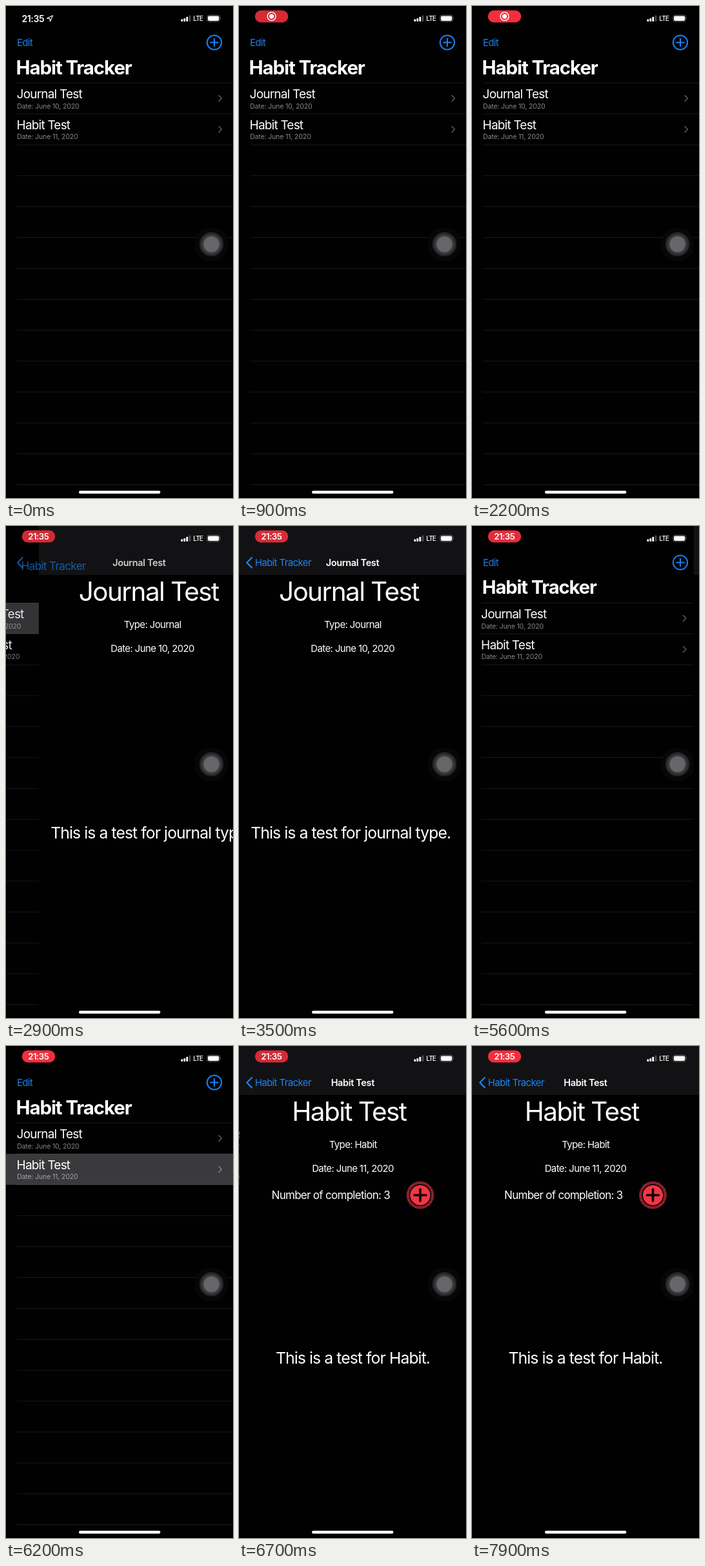
Animation, 352 px wide and 762 px high, one loop 8 s. Source, as an HTML page:

```html
<!DOCTYPE html>
<html lang="en">
<head>
<meta charset="utf-8">
<title>Habit list</title>
<style>
  html, body { margin: 0; width: 100%; height: 100%; overflow: hidden; background: #000; }
  svg { display: block; width: 100vw; height: 100vh; }
  text { font-family: Inter, Roboto, sans-serif; font-optical-sizing: none; fill: #fff; white-space: pre; }
  .mid { text-anchor: middle; }
  .body { font-size: 15px; letter-spacing: -.62px; }
  .blue { fill: #1b83f0; }
  .head { font-size: 29.5px; font-weight: 700; letter-spacing: -1.12px; }
  .bar { font-size: 14.5px; font-weight: 600; letter-spacing: -.36px; }
  .row { font-size: 19px; letter-spacing: -.8px; }
  .sub { font-size: 10.7px; letter-spacing: -.22px; fill: #85858a; }
  .hero { font-size: 40.5px; letter-spacing: -1.62px; }
  .note { font-size: 24.8px; letter-spacing: -.94px; }
  .count { font-size: 17px; letter-spacing: -.71px; }
  .clock { font-size: 14px; font-weight: 600; letter-spacing: -.4px; }
  .small { font-size: 13.2px; letter-spacing: -.45px; }
  .net { font-size: 10.2px; font-weight: 500; letter-spacing: -.95px; }
  .line { fill: none; stroke-linecap: round; stroke-linejoin: round; }
</style>
</head>
<body>
<svg viewBox="0 0 352 762" preserveAspectRatio="none">
  <rect width="352" height="762" fill="#010102"/>

  <g id="list">
    <g id="rules" stroke="#1d1d20" stroke-width=".9"></g>
    <text class="row" x="16.6" y="143">Journal Test</text>
    <text class="sub" x="17" y="158.6">Date: June 10, 2020</text>
    <text class="row" x="16.6" y="191">Habit Test</text>
    <text class="sub" x="17" y="206.4">Date: June 11, 2020</text>
    <path class="line" d="M330 138.5l4.4 4.5l-4.4 4.5M330 186.5l4.4 4.5l-4.4 4.5" stroke="#59595d" stroke-width="1.6"/>
    <rect id="hiA" y="119" width="352" height="48" fill="#fbf8ff" fill-opacity=".23"/>
    <rect id="hiB" y="167" width="352" height="48" fill="#fbf8ff" fill-opacity=".23"/>
  </g>

  <g id="detail">
    <rect width="352" height="762" fill="#010102"/>
    <rect width="352" height="75" fill="#121214"/>
    <rect y="75" width="352" height=".6" fill="#1c1c1e"/>
    <g id="journal">
      <text class="hero mid" x="170.4" y="116">Journal Test</text>
      <text class="body mid" x="176.3" y="158">Type: Journal</text>
      <text class="body mid" x="176.2" y="194.5">Date: June 10, 2020</text>
      <text class="note mid" x="173.2" y="484">This is a test for journal type.</text>
    </g>
    <g id="habit">
      <text class="hero mid" x="170.4" y="116">Habit Test</text>
      <text class="body mid" x="176.2" y="158">Type: Habit</text>
      <text class="body mid" x="176" y="194.5">Date: June 11, 2020</text>
      <text class="count mid" x="141.8" y="237">Number of completion: 3</text>
      <text class="note mid" x="176" y="492">This is a test for Habit.</text>
      <g transform="translate(280.5 231)">
        <circle r="19.2" fill="none" stroke="#e8394a" stroke-width="4.2" pathLength="120" stroke-dasharray="1.15 .85"/>
        <circle r="15.6" fill="#f23543"/>
        <path class="line" d="M-9 0H9M0-9V9" stroke="#0a0506" stroke-width="3.6"/>
      </g>
    </g>
  </g>

  <g id="tools">
    <text class="body blue" x="16.9" y="61.5">Edit</text>
    <g class="line" stroke="#1b83f5" stroke-width="2">
      <circle cx="323" cy="56.5" r="11.1"/>
      <path d="M317.2 56.5h11.6M323 50.7v11.6"/>
    </g>
  </g>
  <text id="big" class="head">Habit Tracker</text>
  <text id="back" class="body blue">Habit Tracker</text>
  <path id="arrow" class="line" d="M19.8 49l-7.6 7.7l7.6 7.7" stroke="#1b83f0" stroke-width="2.3"/>
  <text id="barTitle" class="bar mid" y="61.5"></text>

  <g id="plain">
    <text class="clock" x="24.5" y="24.5">21:35</text>
    <path class="line" d="M72.6 14.8L63.6 18.9L67.9 19.6L68.5 23.8Z" stroke="#fff" stroke-width="1.1"/>
  </g>
  <g id="pill">
    <rect id="pillBox" x="-25.7" y="-9.3" width="51.4" height="18.6" rx="9"/>
    <g id="rec">
      <circle r="6.5" fill="none" stroke="#fff" stroke-width="1.4"/>
      <circle r="3.6" fill="#fff"/>
    </g>
    <text id="pillTime" class="clock small mid" x="-.2" y="4.9">21:35</text>
  </g>

  <g fill="#fff">
    <rect x="271.4" y="20.6" width="2.8" height="3.4" rx=".7"/>
    <rect x="275.4" y="19" width="2.8" height="5" rx=".7"/>
    <rect x="279.4" y="16.8" width="2.8" height="7.2" rx=".7"/>
    <rect x="283.6" y="14.4" width="2.8" height="9.6" rx=".7" fill="#4c4c4f"/>
    <text class="net" x="290.3" y="23.4">LTE</text>
    <rect x="311.7" y="14.2" width="19.8" height="10" rx="3" fill="none" stroke="#67676a" stroke-width=".9"/>
    <rect x="313" y="15.5" width="17.2" height="7.4" rx="1.8"/>
    <path d="M332.4 17.6q1.5 1.6 0 3.2z" fill="#67676a"/>
  </g>

  <g transform="translate(318.6 369)">
    <rect x="-25" y="-25" width="50" height="50" rx="21" fill="#09090a" fill-opacity=".85"/>
    <circle r="18.7" fill="#262628"/>
    <circle r="15.6" fill="#3b3b3d"/>
    <circle r="12.2" fill="#666568"/>
  </g>
  <rect x="113" y="750.8" width="126.4" height="4.4" rx="2.2" fill="#fff"/>
</svg>
<script>
const LOOP = 8000, STEP = 100, W = 352;
const PUSH_A = 2710, POP = 5287, PUSH_B = 6210;
const el = id => document.getElementById(id);
const set = (id, attrs) => { for (const k in attrs) el(id).setAttribute(k, attrs[k]); };
const clamp = v => Math.max(0, Math.min(1, v));
const ramp = (t, a, b) => clamp((t - a) / (b - a));
const mix = (a, b, k) => a + (b - a) * k;

// Critically damped spring from 0 to 1
const spring = ms => {
  const u = Math.max(0, ms) * 0.018;
  return 1 - (1 + u) * Math.exp(-u);
};

// 1 = list fully shown, 0 = detail fully shown
function listShare(t) {
  if (t < PUSH_A) return 1;
  if (t < POP) return 1 - spring(t - PUSH_A);
  if (t < PUSH_B) return spring(t - POP);
  return 1 - spring(t - PUSH_B);
}

function drawPages(t) {
  const q = listShare(t), second = t >= 6000;
  set("list", { transform: `translate(${-0.3 * W * (1 - q)} 0)`, opacity: mix(0.88, 1, q) });
  set("detail", { transform: `translate(${W * q} 0)` });
  set("journal", { opacity: second ? 0 : 1 });
  set("habit", { opacity: second ? 1 : 0 });
  set("hiA", { opacity: t < 2700 ? 0 : t < POP ? 1 : second ? 0 : 1 - spring(t - POP) });
  set("hiB", { opacity: t < 6200 ? 0 : 1 });

  // The large title shrinks into the back button
  const scale = mix(1, 2.06, q);
  const place = `translate(${mix(24.7, 15.6, q)} ${mix(61.5, 106, q)})`;
  const fade = clamp(1 - 2.5 * q);
  set("big", { transform: `${place} scale(${scale / 2.06})`, opacity: ramp(q, 0.3, 0.8) });
  set("back", { transform: `${place} scale(${scale})`, opacity: fade });
  set("arrow", { transform: `translate(${40 * q} 0)`, opacity: fade });
  set("tools", { opacity: ramp(q, 0.3, 1) });
  set("barTitle", { x: 176 + 210 * q, opacity: clamp(1 - 1.5 * q) });
  el("barTitle").textContent = second ? "Habit Test" : "Journal Test";
}

function drawPill(t) {
  const show = ramp(t, 0, 300), grow = mix(1.18, 1, ramp(t, 100, 600));
  const glow = 0.5 + 0.5 * Math.cos((t - 2150) / 1930 * 2 * Math.PI);
  const flip = ramp(t, 2400, 2700);
  const red = [[206, 242], [42, 47], [52, 61]].map(([a, b]) => Math.round(mix(a, b, glow)));
  set("plain", { opacity: 1 - show });
  set("pill", { transform: `translate(50.5 16.1) scale(${grow})`, opacity: show });
  set("pillBox", { fill: `rgb(${red})` });
  set("rec", { opacity: 1 - flip });
  set("pillTime", { opacity: flip });
}

function frame() {
  const t = Math.floor(((performance.now() - start) % LOOP) / STEP) * STEP;
  drawPages(t);
  drawPill(t);
  requestAnimationFrame(frame);
}

el("rules").innerHTML = Array.from({ length: 14 }, (_, i) => {
  const y = (119.2 + 47.87 * i).toFixed(2);
  return `<path d="M17 ${y}H${W}"/>`;
}).join("");

const start = performance.now();
frame();
</script>
</body>
</html>
```
